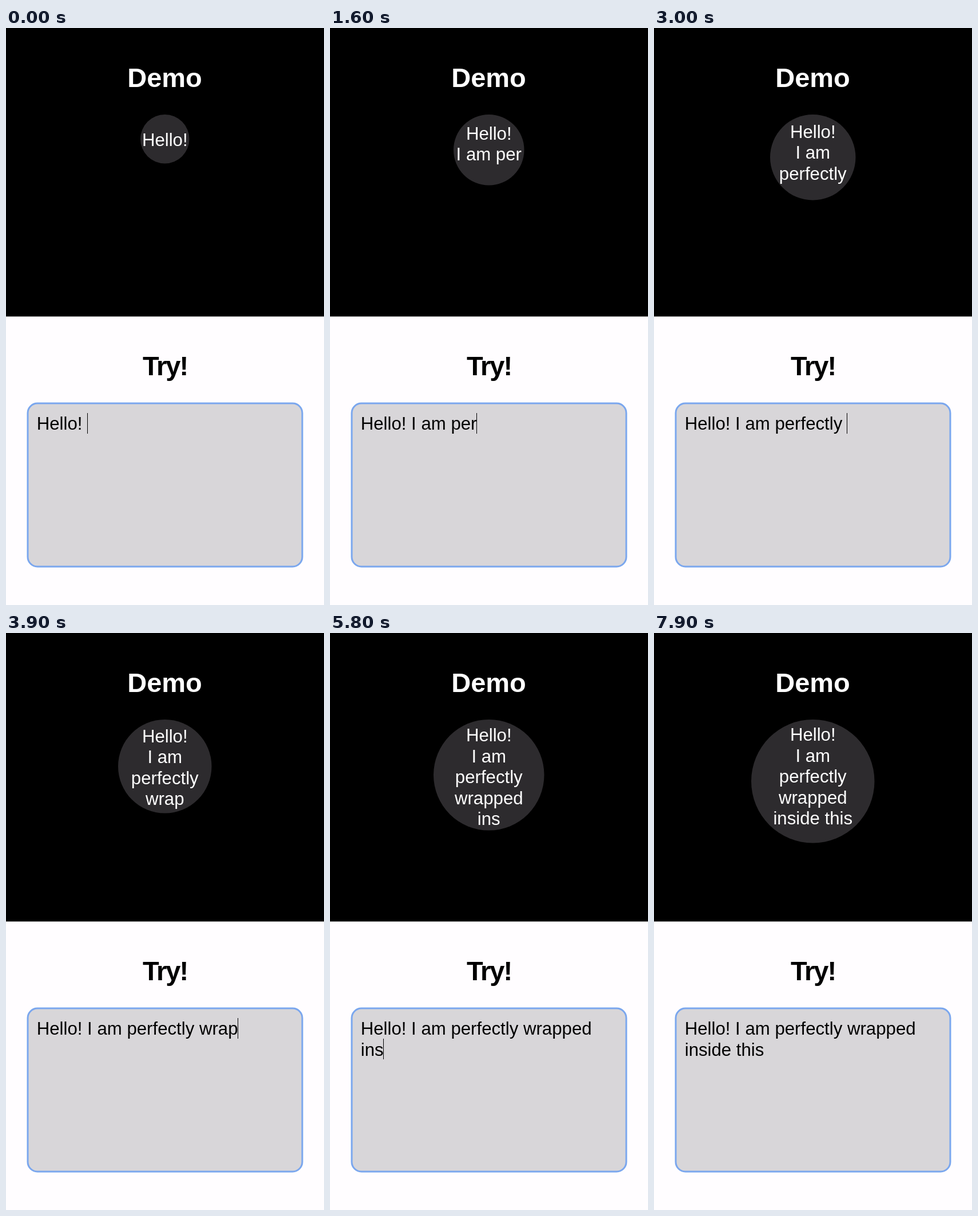
Recreate the animation shown at these times as an HTML page with a canvas. Size 556 px wide and 1007 px high, loop 8000 ms.

```html
<!DOCTYPE html>
<html lang="en">
<head>
<meta charset="utf-8">
<title>Text wrapped in a circle</title>
<style>
  html, body { margin: 0; width: 556px; height: 1007px; overflow: hidden; }
  canvas { display: block; }
</style>
</head>
<body>
<canvas id="stage" width="556" height="1007"></canvas>
<script>
const ctx = document.getElementById('stage').getContext('2d');
const LOOP = 8000, BLINK = 500, LINE = 36.5, CENTER = 277.75, CIRCLE_TOP = 151;
const FAMILY = '"Liberation Sans", Arial, sans-serif';
const BODY_FONT = '31.2px ' + FAMILY;
const TITLE_FONT = 'bold 47px ' + FAMILY;
const MESSAGE = 'Hello! I am perfectly wrapped inside this ';
const ALREADY_TYPED = 7;

// Time of every further keystroke, in tenths of a second
const KEYS = [5, 7, 10, 11, 13, 15, 15, 16, 19, 20, 22, 25, 26, 28, 30,
  34, 36, 37, 39, 42, 44, 45, 47, 49, 49, 58, 59, 60, 62, 64,
  70, 71, 72, 73, 74];

const widthOf = text => ctx.measureText(text).width;

// Greedy word wrap; fits(line, index) tells whether a line has room
function wrap(words, fits) {
  const lines = [words[0]];
  for (const word of words.slice(1)) {
    const last = lines.length - 1;
    const joined = lines[last] + ' ' + word;
    if (fits(joined, last)) lines[last] = joined;
    else lines.push(word);
  }
  return lines;
}

// Smallest circle in which every wrapped line fits between the edges
function fitCircle(text) {
  const words = text.trim().split(' ');
  const lineWidth = (line, i) => widthOf(line) - 2 + 0.7 * i;
  const half = lineWidth(words[0], 0) / 2;
  for (let r = Math.ceil(half); r < 170; r++) {
    const top = r - Math.sqrt(r * r - half * half);
    const chord = y => 2 * Math.sqrt(Math.max(0, r * r - (y - r) ** 2));
    const fits = (line, i) => {
      const y = top + i * LINE;
      return lineWidth(line, i) <= Math.min(chord(y), chord(y + LINE)) + 0.01;
    };
    const lines = wrap(words, fits);
    if (lines.every(fits)) return { r, top, lines };
  }
}

function drawTitle(text, x, y, color, spacing) {
  ctx.font = TITLE_FONT;
  ctx.letterSpacing = spacing;
  ctx.textAlign = 'center';
  ctx.fillStyle = color;
  ctx.fillText(text, x, y);
  ctx.letterSpacing = '0px';
}

function drawCircle(text) {
  ctx.font = BODY_FONT;
  ctx.textAlign = 'center';
  const { r, top, lines } = fitCircle(text);
  ctx.fillStyle = '#2d2b2e';
  ctx.beginPath();
  ctx.arc(CENTER, CIRCLE_TOP + r - 0.25, r - 0.25, 0, 2 * Math.PI);
  ctx.fill();
  ctx.fillStyle = '#fff';
  lines.forEach((line, i) =>
    ctx.fillText(line, CENTER, CIRCLE_TOP + top + 30 + i * LINE));
}

function drawInput(text, caretOn) {
  const left = 53.7, top = 672;
  ctx.beginPath();
  ctx.roundRect(38, 655, 480, 285, 17);
  ctx.fillStyle = '#d8d6d9';
  ctx.fill();
  ctx.strokeStyle = '#7ba7ee';
  ctx.lineWidth = 3;
  ctx.stroke();

  ctx.font = BODY_FONT;
  ctx.textAlign = 'left';
  ctx.fillStyle = '#000';
  const lines = wrap(text.split(' '), line => widthOf(line.trimEnd()) <= 450);
  lines.forEach((line, i) => ctx.fillText(line, left, top + 29 + i * LINE));
  if (caretOn) {
    const row = lines.length - 1;
    ctx.fillRect(Math.floor(left + widthOf(lines[row])), top + Math.floor(row * LINE), 1, 36);
  }
}

function draw(now) {
  const t = now % LOOP;
  const pressed = KEYS.filter(k => k * 100 <= t);
  const text = MESSAGE.slice(0, ALREADY_TYPED + pressed.length);
  const lastKey = pressed.length ? pressed[pressed.length - 1] * 100 : -100;

  ctx.fillStyle = '#fffdff';
  ctx.fillRect(0, 0, 556, 1007);
  ctx.fillStyle = '#000';
  ctx.fillRect(0, 0, 556, 503.5);
  drawTitle('Demo', 277.5, 103, '#fff', '0px');
  drawTitle('Try!', 278, 606, '#000', '-2px');
  drawCircle(text);
  drawInput(text, t - lastKey < BLINK);
}

const start = performance.now();
function tick() {
  draw(performance.now() - start);
  requestAnimationFrame(tick);
}
tick();
</script>
</body>
</html>
```
